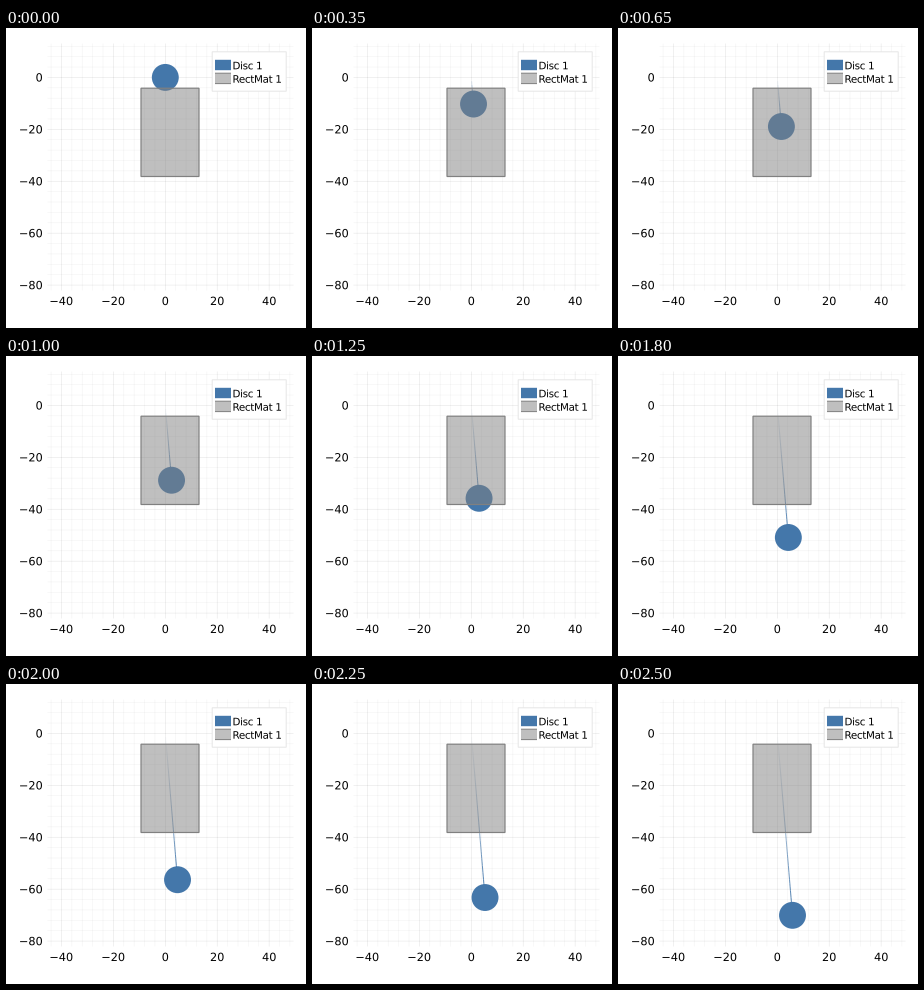
These frames come from a looping animation (300x300 px, 2.55 s). A matplotlib script:

```python
import matplotlib.pyplot as plt
import numpy as np
from matplotlib.animation import FuncAnimation
from matplotlib.collections import LineCollection
from matplotlib.colors import to_rgb
from matplotlib.patches import Circle, PathPatch, Rectangle
from matplotlib.textpath import TextPath
from matplotlib.transforms import Affine2D

SIZE, DPI = 300, 100
FRAMES, INTERVAL = 51, 50
PX = 72 / DPI                      # one pixel in points
BLUE, GRAY = "#4477aa", "#808080"
GLASS = (*to_rgb(GRAY), 0.5)

SCALE = 2.596                      # pixels per data unit
X0, Y0 = 159.3, 49.4               # pixel position of the data origin
LEFT, RIGHT, TOP, BOTTOM = 41.5, 287.5, 15.5, 262.5
MAT = (135.0, 60.2, 58.0, 88.3)    # x, y, width, height

RADIUS = 13.45
SPEED, DRAG, SLOPE = 3.82, 0.0108, 0.0836
ENTER, LEAVE = 3, 27               # frames spent sliding over the mat

fig = plt.figure(figsize=(SIZE / DPI, SIZE / DPI), dpi=DPI, facecolor="white")
ax = fig.add_axes([0, 0, 1, 1])
ax.set_xlim(0, SIZE)
ax.set_ylim(SIZE, 0)
ax.axis("off")


def position(i):
    """Disc centre: steady outside the mat, slowed evenly on it."""
    on_mat = min(max(i - ENTER, 0), LEAVE - ENTER)
    after = max(i - LEAVE, 0)
    fall = SPEED * i - DRAG * (on_mat ** 2 / 2 + on_mat * after)
    return X0 + SLOPE * fall, Y0 + fall


def line(x, y, **style):
    ax.plot(x, y, snap=False, solid_capstyle="butt", **style)


def box(x, y, w, h, **style):
    ax.add_patch(Rectangle((x, y), w, h, snap=False, **style))


def label(x, y, s, size, align=0.0, tracking=0.0):
    """Set unhinted text on baseline y; align 0 is left, 0.5 centre, 1 right."""
    def outline(part):
        return TextPath((0, 0), part, size=size, prop={"family": "DejaVu Sans"})

    full = outline(s).get_extents()
    x -= full.x0 + align * full.width
    for i, ch in enumerate(s):
        if ch == " ":
            continue
        shift = outline(s[:i + 1]).get_extents().x1 - outline(ch).get_extents().x1
        place = Affine2D().scale(1, -1).translate(x + shift + i * tracking, y)
        ax.add_patch(PathPatch(place.transform_path(outline(ch)), fc="black",
                               ec="none", snap=False, zorder=11))


def draw_grid():
    for v in range(-80, 52, 4):
        style = dict(color="black", alpha=0.05 if v % 20 else 0.1,
                     lw=0.56 * PX, zorder=1)
        x, y = X0 + v * SCALE, Y0 - v * SCALE
        if LEFT <= x <= RIGHT:
            line([x, x], [TOP, BOTTOM], **style)
        if TOP <= y <= BOTTOM:
            line([LEFT, RIGHT], [y, y], **style)


def draw_ticks():
    for v in range(-80, 41, 20):
        s = str(v).replace("-", "\u2212")
        if v >= -40:
            label(X0 + v * SCALE, 277, s, 11.3, align=0.5)
        if v <= 0:
            label(36, Y0 - v * SCALE + 4.1, s, 11.3, align=1)


def draw_legend():
    box(206.2, 23.8, 74, 39.4, fc="white", ec="#e6e6e6", lw=PX, zorder=9)
    box(209, 31.8, 16, 10.4, fc=BLUE, ec="none", zorder=10)
    box(209, 45.2, 16, 10.4, fc=GLASS, ec="none", zorder=10)
    for y in (45.2, 55.6):
        line([209, 225], [y, y], color=GRAY, lw=PX, zorder=10)
    label(227.5, 41.3, "Disc 1", 10.3, tracking=-0.3)
    label(227.5, 54.7, "RectMat 1", 10.3, tracking=-0.3)


draw_grid()
draw_ticks()
draw_legend()

trail = LineCollection([], linewidths=PX, zorder=3)
ax.add_collection(trail, autolim=False)
disc = Circle((X0, Y0), RADIUS, fc=BLUE, ec="none", zorder=4)
ax.add_patch(disc)
box(*MAT, fc=GLASS, ec=GRAY, lw=1.2 * PX, zorder=5)


def update(i):
    points = [position(k) for k in range(i + 1)]
    disc.center = points[-1]
    trail.set_segments(list(zip(points[:-1], points[1:])))
    trail.set_color([(*to_rgb(BLUE), a) for a in np.linspace(0, 1, i)])
    return trail, disc


anim = FuncAnimation(fig, update, frames=FRAMES, interval=INTERVAL,
                     repeat=True, repeat_delay=0, blit=False)
plt.show()
```
